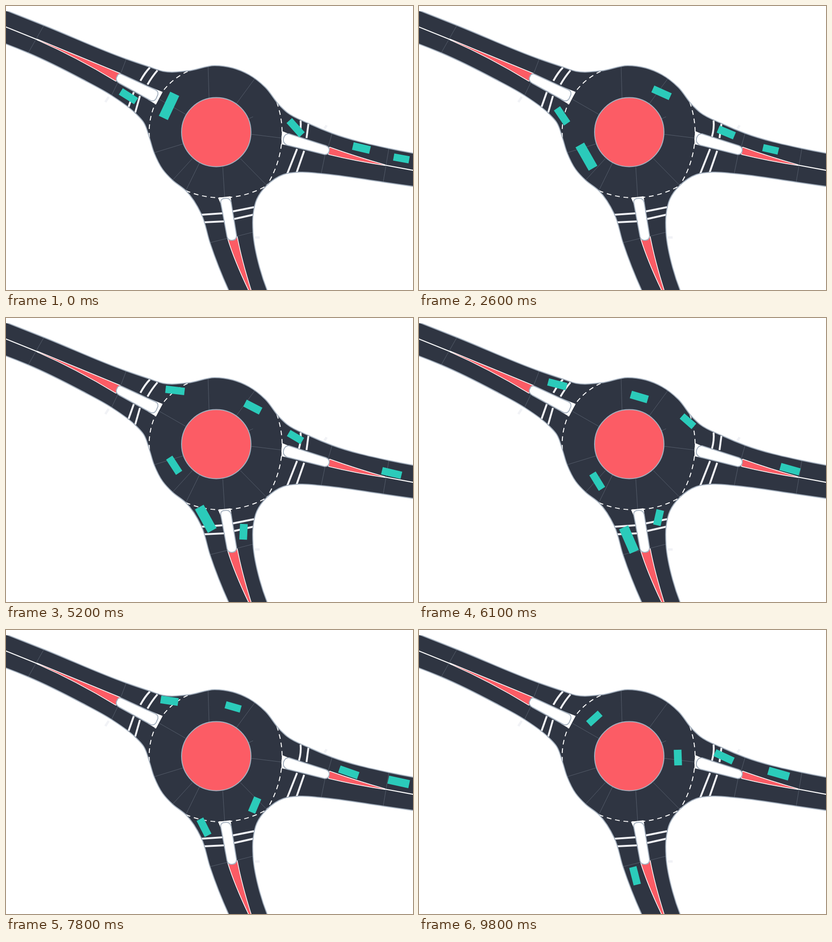
An HTML page with a canvas for the animation above (9.9 s loop, 860 by 600 pixels).

```html
<!DOCTYPE html>
<html lang="en">
<head>
<meta charset="utf-8">
<title>Roundabout</title>
<style>
  html, body { margin: 0; width: 100%; height: 100%; overflow: hidden; background: #fff; }
  canvas { display: block; }
</style>
</head>
<body>
<canvas id="stage" width="860" height="600"></canvas>
<script>
const ctx = document.getElementById('stage').getContext('2d');
const LOOP = 9900, STEP = 100;
const ROAD = '#2f3542', EDGE = '#a4b0be', PAINT = '#f1f2f6', RED = '#fc5c65', TEAL = '#2bcbba';

// Turns a few key points into a smooth chain of Bézier segments.
function smooth(text) {
  const points = text.split(' ').map(pair => pair.split(',').map(Number));
  const legs = points.slice(1).map(([x, y], i) => {
    const dx = x - points[i][0], dy = y - points[i][1];
    return { length: Math.hypot(dx, dy), angle: Math.atan2(dy, dx) };
  });
  const headings = points.map((_, i) => {
    const a = legs[i - 1], b = legs[i];
    if (!a || !b) return 0;
    const blend = f => f(a.angle) * b.length + f(b.angle) * a.length;
    return Math.atan2(blend(Math.sin), blend(Math.cos));
  });
  const last = legs.length;
  headings[0] = 2 * legs[0].angle - headings[1];
  headings[last] = 2 * legs[last - 1].angle - headings[last - 1];
  const handle = (i, reach) =>
    `${points[i][0] + reach * Math.cos(headings[i])} ${points[i][1] + reach * Math.sin(headings[i])}`;
  return `M${points[0]}` + legs.map(({ length }, i) =>
    `C${handle(i, length / 3)} ${handle(i + 1, -length / 3)} ${points[i + 1]}`).join('');
}

function stroke(d, color, width, dash = []) {
  ctx.strokeStyle = color;
  ctx.lineWidth = width;
  ctx.setLineDash(dash);
  ctx.stroke(new Path2D(d));
}

function fill(d, color) {
  ctx.fillStyle = color;
  ctx.fill(new Path2D(d));
}

// Road borders, each running from one arm to the next.
const borders = [
  '-6,7 80,41 254,112 304,129 332,138 385,137 441,126 513,145 548,172 577,209 594,225 641,249 689,269 809,301 866,312',
  '866,382 797,372 666,354 622,351 586,356 551,379 530,408 522,442 522,479 536,553 554,606',
  '473,606 431,500 413,440 380,390 352,368 331,345 313,310 303,278 291,246 274,227 223,189 160,154 47,99 -6,78'
].map(smooth);
const roadShape = borders.join('').replace(/(?!^)M/g, 'L') + 'Z';

const centre = 'M371 266.5a73.3 73 0 1 0 146.6 0a73.3 73 0 1 0 -146.6 0Z';

const seams = 'M80 41L47 99M254 112L243 141M236 162L223 189M427 127L429 194M526 153L487 206M522 234L513 238' +
  'M518 271L583 279M324 197L380 229M375 291L313 310M394 322L352 368M409 331L380 390M458 340L462 404' +
  'M495 322L551 379M689 269L681 297M674 315L666 354M809 301L797 372M431 500L467 491M486 487L521 478';

const giveWay = [
  'M384 138A140 140 0 0 0 304 285',
  smooth('572,203 583,255 578,315 551,379'),
  smooth('380,390 445,405 550,380')
].join('');

const crossings = 'M304 130Q294 140 284 158M320 136Q308 150 299 166M270 182L259 213M283 190L273 225' +
  'M622.5 242Q624 259 619 276M639 249L635 279M615 302L594 355M630 306L614 352' +
  'M413 441L457 438M418 457L460 455M479 434L524 425M482 450L522 441';

const splitters = 'M66 71L241 143 232 158Q150 108 66 71Z' +
  'M800 336Q740 319 684 299L682 313Q740 327 800 336Z' +
  'M516 606Q484 540 469 491L488 488Q498 540 519 606Z';

const islandPads = 'M297 168L331 181.5 317 208 300 198ZM583 264L602 272 600 296 582 292ZM448 405L474.5 402 477 418 455 421Z';
const islands =
  'M244 144L296 168 316 177Q322 180 321 187L317 196Q313 202 306 200L239 163Q231 158 233.5 151L236 146Q239 142 244 144Z' +
  'M598 270L676 295Q684 298 683 306Q681 315 672 313.5L594 294Q585 290 586 281Q589 269 598 270Z' +
  'M454 417Q452 407 463 406.5Q474 405 476 416L487 484Q488 494 478 495Q469 496 467 487Z';

const strayMarks = 'M217 192L210 203M677.5 252L673 259M526 489L536 489';

function drawRoads() {
  ctx.fillStyle = '#fff';
  ctx.fillRect(0, 0, 860, 600);
  ctx.save();
  ctx.beginPath();
  ctx.rect(0, 11, 860, 589);
  ctx.clip();
  ctx.lineJoin = 'round';
  stroke(strayMarks, PAINT, 5);
  fill(roadShape, ROAD);
  stroke(seams, 'rgba(164,176,190,.33)', 1);
  stroke(crossings, PAINT, 4);
  stroke(giveWay, '#fff', 2, [10, 8]);
  stroke(borders.join(''), EDGE, 2);
  stroke(splitters, '#fff', 3);
  fill(splitters, RED);
  stroke('M-2 43.5L66 71M800 336L862 347.5', '#fff', 2);
  fill(islandPads, '#fff');
  fill(islands, '#fff');
  stroke(islands, EDGE, 2);
  fill(centre, RED);
  stroke(centre, EDGE, 2);
  ctx.restore();
}

// Pace is the speed at the start and end of the route, relative to its average.
const vehicles = [
  { size: [56.5, 21], from: 0, until: 7100, pace: [0.86, 1.25],
    route: '344.5,211 335,245 338,279 377,356 422,424 464,523' },
  { size: [38.3, 15.8], from: 0, until: 9800, pace: [0.4, 1.45],
    route: '258.7,190.7 284,210 320,259 396,377 418,416 456.5,519.3' },
  { size: [40.3, 15.6], from: 0, until: 6900, pace: [0.72, 1.4],
    route: '612,257 520,187 459,165 413,155.5 358,153 300,142 231,120' },
  { size: [37.2, 16.3], from: 0, until: 9400, pace: [0.52, 1.3],
    route: '751,300 696,284.5 601,244 519,187 459,165 413,155 349,150 228,118' },
  { size: [33.3, 15.2], from: 0, until: 9800, pace: [0.45, 1.05],
    route: '835.5,322 785,312 702,291.5 611,251 525,185 478,162 421,160 370.5,187' },
  { size: [42.3, 15.7], from: 3000, until: 9800, pace: [1.05, 1.25],
    route: '896,342.5 815,327.5 760,312.5 644.5,268' },
  { size: [45.2, 17.2], from: 6000, until: 9800, pace: [0.95, 1.1],
    route: '889,332 830,321 760,303.5' },
  { size: [33, 16.3], from: 2800, until: 9800, pace: [1.75, 1.55],
    route: '528,581 513,525 502,450 512,401 527,366 543,319 547,269.5' }
];

for (const v of vehicles) {
  v.path = document.createElementNS('http://www.w3.org/2000/svg', 'path');
  v.path.setAttribute('d', smooth(v.route));
  v.length = v.path.getTotalLength();
}

const travel = (u, [start, end]) =>
  u * u * (3 - 2 * u) + start * u * (1 - u) ** 2 - end * u * u * (1 - u);

function drawVehicle({ size: [long, wide], from, until, pace, path, length }, t) {
  if (t < from || t > until) return;
  const at = length * travel((t - from) / (until - from), pace);
  const { x, y } = path.getPointAtLength(at);
  const back = path.getPointAtLength(Math.max(at - 3, 0));
  const ahead = path.getPointAtLength(Math.min(at + 3, length));
  ctx.save();
  ctx.translate(x, y);
  ctx.rotate(Math.atan2(ahead.y - back.y, ahead.x - back.x));
  ctx.fillStyle = TEAL;
  ctx.fillRect(-long / 2, -wide / 2, long, wide);
  ctx.restore();
}

let start;
function frame(now) {
  start ??= now;
  const t = Math.floor((now - start) % LOOP / STEP) * STEP;
  drawRoads();
  for (const v of vehicles) drawVehicle(v, t);
  requestAnimationFrame(frame);
}
requestAnimationFrame(frame);
</script>
</body>
</html>
```
